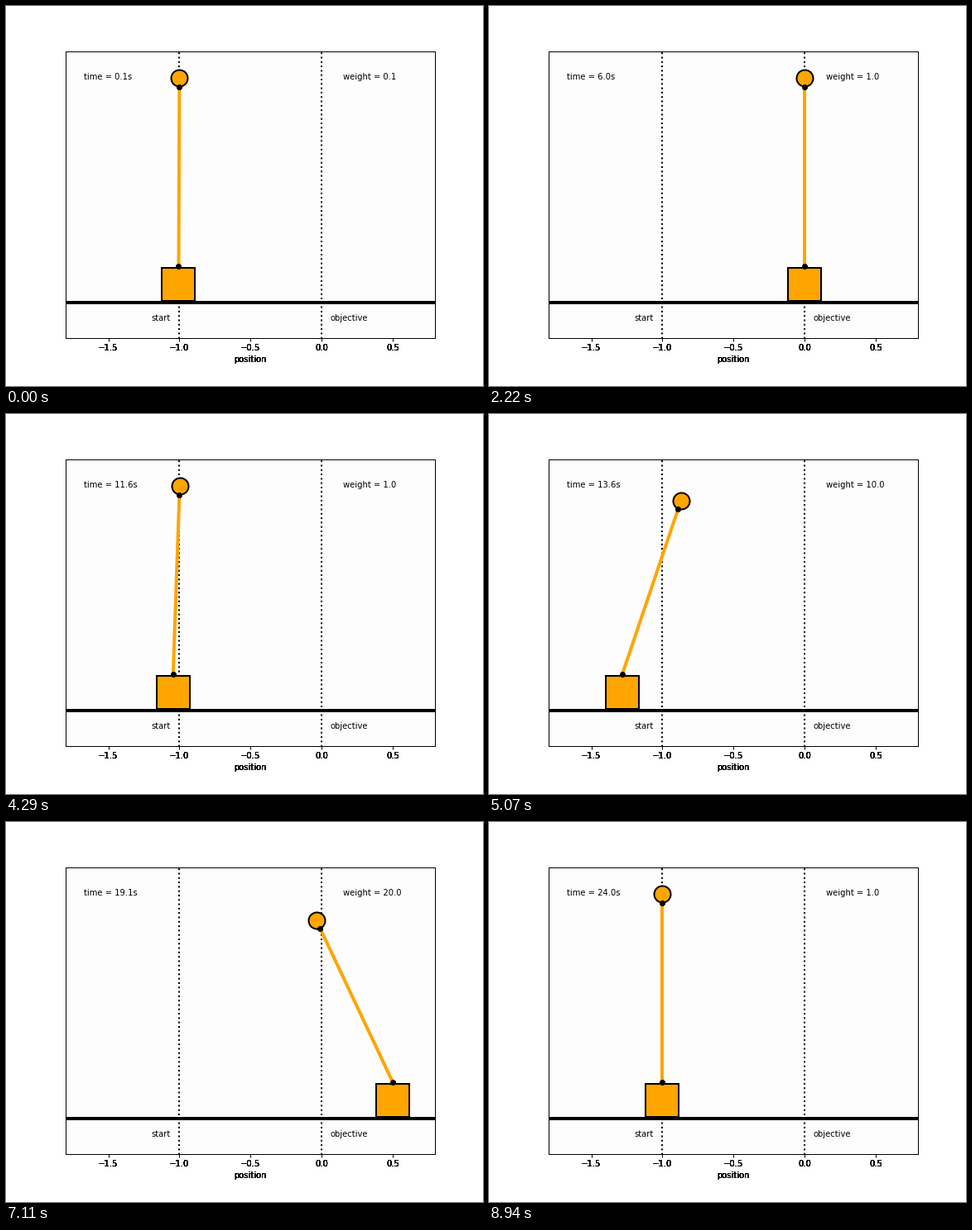
Animation of 576x460 px, one loop 8.97 s. Source, as a matplotlib script:

```python
import numpy as np
import matplotlib.pyplot as plt
from matplotlib.animation import FuncAnimation

DPI = 72
W, H = 576, 460
POINTS = 300
PHASE = 75                      # samples per manoeuvre
CART = 10.0
WEIGHTS = [0.1, 1.0, 10.0, 20.0]

time = np.linspace(0, 24, POINTS)
h = time[1]


def manoeuvre(weight, start, goal, steps):
    """Least-effort rest-to-rest move of a linear cart and pole (implicit Euler)."""
    eps = weight / (CART + weight)
    A = np.array([[0, 1, 0, 0], [0, 0, -eps, 0], [0, 0, 0, 1], [0, 0, 1, 0]])
    step = np.linalg.inv(np.eye(4) - h * A)
    push = step @ np.array([0, 1, 0, -1]) * h

    cols = [push]
    for _ in range(steps - 1):
        cols.append(step @ cols[-1])
    reach = np.array(cols[::-1]).T
    force = np.linalg.lstsq(reach, np.array([goal - start, 0, 0, 0]), rcond=None)[0]

    state = np.zeros(4)
    path = [state]
    for f in force:
        state = step @ state + push * f
        path.append(state)
    path = np.array(path)
    return start + path[:, 0], path[:, 2]


pos = np.full(POINTS, -1.0)
theta = np.zeros(POINTS)
for k, w in enumerate(WEIGHTS):
    a, b = (-1, 0) if k % 2 == 0 else (0, -1)
    first = k * PHASE
    steps = min(PHASE, POINTS - 1 - first) - 1
    x, th = manoeuvre(w, a, b, steps)
    pos[first:first + steps + 1] = x
    theta[first:first + steps + 1] = th

plt.rcParams.update({"font.family": "DejaVu Sans", "font.size": 10,
                     "axes.linewidth": 1, "xtick.major.width": 1})
fig = plt.figure(figsize=(W / DPI, H / DPI), dpi=DPI, facecolor="white")
ax = fig.add_axes([0.125, 57.6 / H, 0.775, 347.9 / H], facecolor="#fdfdfd")
ax.set(xlim=(-1.8, 0.8), ylim=(-0.4, 1.2), xlabel="position",
       xticks=[-1.5, -1, -0.5, 0, 0.5])
ax.yaxis.set_visible(False)

ax.plot([-2.5, 2.5], [-0.2, -0.2], "k-", lw=4)
for x in (-1, 0):
    ax.plot([x, x], [-1.5, 1.5], "k:", lw=2)


def mass(marker, size):
    return ax.plot([], [], ls="none", marker=marker, ms=size, color="orange",
                   mec="k", mew=2)[0]


cart = mass("s", 40)
bob = mass("o", 20)
rod, = ax.plot([], [], "o-", color="orange", lw=4, ms=6, mec="k", mfc="k")

ax.text(-1.06, -0.3, "start", ha="right")
ax.text(0.06, -0.3, "objective", ha="left")
clock = ax.text(0.05, 0.9, "", transform=ax.transAxes)
load = ax.text(0.75, 0.9, "", transform=ax.transAxes)

# Overprint the axis labels so that their soft edges turn solid black.
fig.canvas.draw()
for lab in [*ax.get_xticklabels(), ax.xaxis.label]:
    for _ in range(6):
        ax.text(*lab.get_position(), lab.get_text(), transform=lab.get_transform(),
                ha=lab.get_ha(), va=lab.get_va())


def update(frame):
    i = frame + 1
    x, s, c = pos[i], np.sin(theta[i]), np.cos(theta[i])
    cart.set_data([x], [-0.1])
    bob.set_data([x + 1.05 * s], [1.05 * c])
    rod.set_data([x, x + s], [0, c])
    clock.set_text(f"time = {time[i]:.1f}s")
    weight = WEIGHTS[i // PHASE] if i < POINTS - 1 else 1.0
    load.set_text(f"weight = {weight:.1f}")
    return cart, bob, rod, clock, load


anim = FuncAnimation(fig, update, frames=POINTS - 1, interval=30,
                     repeat=True, repeat_delay=0, blit=False)
plt.show()
```
